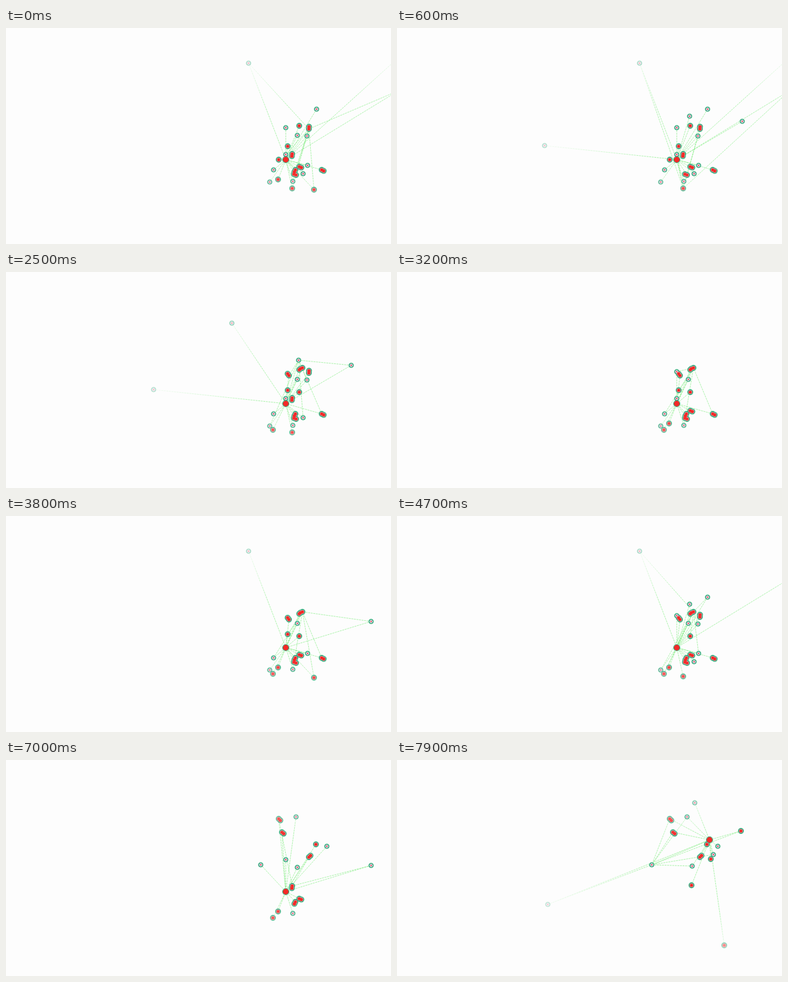
These frames come from a looping animation (600 by 338 pixels, 8 s). An HTML page with a canvas:

```html
<!DOCTYPE html>
<html lang="en">
<head>
<meta charset="utf-8">
<title>Network activity</title>
<style>
html, body { margin: 0; height: 100%; overflow: hidden; background: #fdfdfd; }
canvas { display: block; }
</style>
</head>
<body>
<canvas id="stage" width="600" height="338"></canvas>
<script>
const ctx = document.getElementById('stage').getContext('2d');
const LOOP = 8000, STEP = 100, MOVE = 6500, SETTLED = 7600;
const SIZES = [{ ring: 3.6, core: 1 }, { ring: 4.2, core: 2.6 }, { ring: 5.1, core: 4.4 }];

// Stable pseudo-random value in 0..1.
function hash(x, y, salt) {
  const v = Math.sin(x * 12.9898 + y * 78.233 + salt * 37.719) * 43758.5453;
  return v - Math.floor(v);
}

// duty: share of the time a place is active; load: chance of a heavy dot
function places(duty, load, late, points) {
  return points.map(([x, y]) => ({ x, y, duty, load, late }));
}

const busy = places(0.85, 0.85, false, [
  [446, 197], [451, 222], [457, 153], [462, 150], [472, 158], [416, 247],
  [446, 251], [452, 230], [457, 217], [439, 185], [492, 222]]);
const often = places(0.65, 0.12, false, [
  [456, 138], [436, 156], [441, 162], [454, 168], [436, 198], [424, 237], [417, 222],
  [470, 215], [463, 228], [457, 188], [469, 169], [425, 206], [447, 240], [411, 241]]);
const rare = places(0.3, 0.12, false, [
  [538, 146], [484, 127], [569, 165], [352, 80], [378, 55], [400, 54], [505, 198],
  [480, 253], [230, 184], [612, 46], [612, 98]]);
const north = places(1, 0.5, true, [
  [464, 67], [425, 92], [452, 89], [430, 113], [536, 111], [500, 135], [397, 164],
  [489, 155], [493, 148], [472, 152], [460, 166], [459, 196], [483, 132], [235, 226], [510, 290]]);
const sites = [...busy, ...often, ...rare, ...north];

const southHub = { x: 436, y: 206, size: 2 };
const northHub = { x: 487, y: 125, size: 2 };

// Each place switches at its own pace; the whole crowd moves north near the end.
function active({ x, y, duty, late }, t) {
  const moved = t >= MOVE + (SETTLED - MOVE) * hash(x, y, 1);
  if (moved !== late) return false;
  const period = 500 + 900 * hash(x, y, 2);
  const slot = Math.floor(t / period + hash(x, y, 3));
  return hash(x, y, slot + 10) < duty;
}

// One dot, or a close pair that melts into a blob where traffic is heavy.
function dotsAt({ x, y, load }) {
  if (hash(x, y, 4) > load) return [{ x, y, size: 0 }];
  const dot = { x, y, size: 1 };
  if (hash(x, y, 5) > 0.5) return [dot];
  const angle = 7 * hash(x, y, 6);
  return [dot, { x: x + 3.5 * Math.cos(angle), y: y + 3.5 * Math.sin(angle), size: 1 }];
}

function link(a, b) {
  ctx.beginPath();
  ctx.moveTo(a.x, a.y);
  ctx.lineTo(b.x, b.y);
  ctx.stroke();
}

// White haze that thickens away from the busy area.
function haze() {
  ctx.save();
  ctx.translate(520, 170);
  ctx.scale(270, 130);
  const g = ctx.createRadialGradient(0, 0, 0.5, 0, 0, 1.4);
  g.addColorStop(0, 'rgba(253,253,253,0)');
  g.addColorStop(0.5, 'rgba(253,253,253,0.5)');
  g.addColorStop(1, 'rgba(253,253,253,0.95)');
  ctx.fillStyle = g;
  ctx.fillRect(-3, -3, 6, 6);
  ctx.restore();
}

function layer(dots, color, radius) {
  ctx.fillStyle = color;
  for (const d of dots) {
    ctx.beginPath();
    ctx.arc(d.x, d.y, radius(SIZES[d.size]), 0, 7);
    ctx.fill();
  }
}

function draw(t) {
  const hub = t < (MOVE + SETTLED) / 2 ? southHub : northHub;
  const live = sites.filter(s => active(s, t));
  const dots = [hub, ...live.flatMap(dotsAt)];
  const shift = Math.floor(t / 1300);
  const relay = live[Math.floor(hash(shift, 8, 0) * Math.min(live.length, busy.length))];

  ctx.fillStyle = '#fdfdfd';
  ctx.fillRect(0, 0, 600, 338);
  ctx.strokeStyle = 'rgba(80,230,80,0.6)';
  ctx.lineWidth = 0.75;
  ctx.setLineDash([3, 1]);
  for (const s of live) {
    link(s, hub);
    if (hash(s.x, s.y, shift) < 0.35) link(s, relay);
  }
  haze();
  layer(dots, '#b4ecd0', s => s.ring + 0.8);
  layer(dots, '#1c9468', s => s.ring);
  layer(dots, '#e2d8ea', s => s.ring - 1.1);
  layer(dots, '#f32a28', s => s.core);
  haze();
}

let last = -1;
function tick() {
  const t = Math.floor(performance.now() % LOOP / STEP) * STEP;
  if (t !== last) draw(last = t);
  requestAnimationFrame(tick);
}
tick();
</script>
</body>
</html>
```
